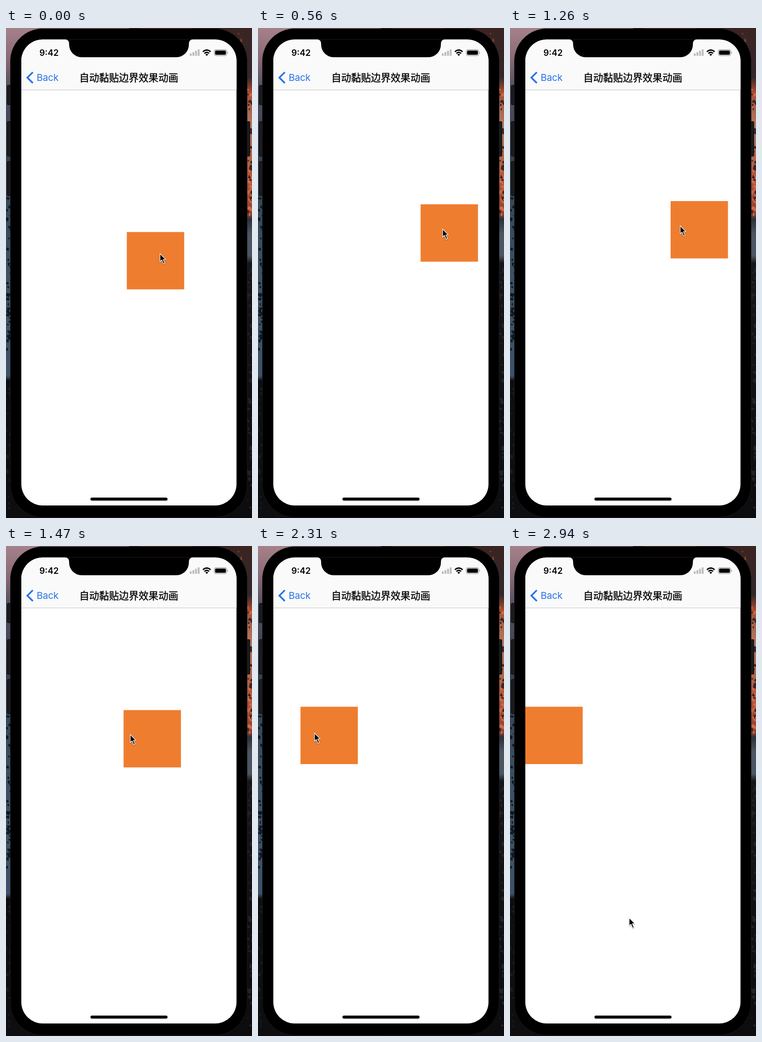
Animation, 530 px wide and 1056 px high, one loop 3010 ms. Source, as an HTML page:

```html
<!DOCTYPE html>
<html lang="zh">
<head>
<meta charset="utf-8">
<title>自动黏贴边界效果动画</title>
<style>
  html, body { margin: 0; width: 100%; height: 100%; overflow: hidden; background: #0c0c0e; }
  svg { display: block; width: 100%; height: 100%; }
  text { font-family: Inter, "Noto Sans", sans-serif; }
  .time { font-size: 18.5px; font-weight: 600; }
  .back { font-size: 20.5px; letter-spacing: -.2px; fill: #2874e6; }
  .title { font-family: "Noto Sans CJK SC", "Noto Sans CJK", sans-serif; font-size: 21.3px;
    font-weight: 500; stroke: #000; stroke-width: .35px; }
  .cursor { filter: drop-shadow(0 1.2px 1px rgba(0, 0, 0, .4)); }
</style>
</head>
<body>
<svg viewBox="0 0 530 1056">
  <defs>
    <linearGradient id="leftSky" x2="0" y2="1">
      <stop offset="0" stop-color="#a5828a"/>
      <stop offset=".06" stop-color="#8b6a76"/>
      <stop offset=".12" stop-color="#55505f"/>
      <stop offset=".25" stop-color="#33414f"/>
      <stop offset=".5" stop-color="#3c5164"/>
      <stop offset=".71" stop-color="#3d5268"/>
      <stop offset=".72" stop-color="#0d0e11"/>
      <stop offset="1" stop-color="#0e0e10"/>
    </linearGradient>
    <linearGradient id="rightSky" x2="0" y2="1">
      <stop offset="0" stop-color="#3a2421"/>
      <stop offset=".1" stop-color="#33272a"/>
      <stop offset=".13" stop-color="#a84c30"/>
      <stop offset=".2" stop-color="#a8806c"/>
      <stop offset=".3" stop-color="#b3573b"/>
      <stop offset=".38" stop-color="#8f4431"/>
      <stop offset=".39" stop-color="#2b3038"/>
      <stop offset=".42" stop-color="#4c5562"/>
      <stop offset=".465" stop-color="#4c5562"/>
      <stop offset=".48" stop-color="#151619"/>
      <stop offset="1" stop-color="#0c0c0e"/>
    </linearGradient>
  </defs>

  <rect width="265" height="1056" fill="url(#leftSky)"/>
  <rect x="265" width="265" height="1056" fill="url(#rightSky)"/>
  <path d="M288 0h112l12 3h-120z" fill="#7c3526"/>
  <g id="rocks"></g>

  <g fill="#1b1b1d" stroke="#08080a">
    <rect x="2.5" y="123.5" width="12" height="42" rx="2"/>
    <rect x="2.5" y="201.5" width="12" height="75" rx="2"/>
    <rect x="2.5" y="287.5" width="12" height="74" rx="2"/>
    <rect x="514.5" y="201.5" width="11" height="75" rx="2"/>
  </g>
  <rect x="9.5" y="1.5" width="510" height="1053" rx="70" stroke="#19191b"/>

  <rect x="33" y="24.7" width="463.6" height="1004.3" rx="46" fill="#fff"/>
  <path d="M33 133V70.7A46 46 0 0 1 79 24.7H450.6A46 46 0 0 1 496.6 70.7V133Z" fill="#fafafa"/>
  <path d="M33 133.5H496.6" stroke="#c3c3c5"/>
  <path d="M127 24.2Q136 25 136 34V36A27 27 0 0 0 163 63H367A27 27 0 0 0 394 36V34Q394 25 403 24.2Z"/>

  <text class="time" x="72" y="60">9:42</text>
  <g fill="#bcbcbe">
    <rect x="396" y="54.5" width="4" height="5.5" rx="1"/>
    <rect x="401.7" y="52" width="4" height="8" rx="1"/>
    <rect x="407.4" y="49" width="4" height="11" rx="1"/>
    <rect x="413.1" y="46" width="4" height="14" rx="1"/>
  </g>
  <g fill="none" stroke="#000" stroke-width="2.7">
    <path d="M424.2 51.2Q432.5 43.8 440.8 51.2"/>
    <path d="M427.3 54.8Q432.5 50.2 437.7 54.8"/>
  </g>
  <path d="M429.5 57Q432.5 54.6 435.5 57L432.5 60.2Z"/>
  <rect x="448.6" y="46.6" width="27" height="13" rx="3.8" fill="none" stroke="#98989a" stroke-width="1.2"/>
  <rect x="450.4" y="48.4" width="23.4" height="9.4" rx="2.3"/>
  <path d="M477 51Q480 53 477 55.5Z" fill="#98989a"/>

  <path d="M57.8 95.2L46 106.9L57.8 118.6" fill="none" stroke="#2874e6" stroke-width="3.6"/>
  <text class="back" x="66" y="114">Back</text>
  <text class="title" x="158" y="114.5">自动黏贴边界效果动画</text>
  <rect x="182" y="1012" width="166" height="6.5" rx="3.2"/>

  <rect id="box" width="123.6" height="123.6" fill="#ef7d2f"/>
  <g id="cursor"><path class="cursor" d="M-.3 .3V17.6L3.6 14.1L7.2 22.3L10.2 21L6.7 12.9H12Z"
    stroke="#fff" stroke-width="1.3" stroke-linejoin="round"/></g>
</svg>
<script>
  const STEP = 70, FRAMES = 43;
  const byId = id => document.getElementById(id);

  // Each key: step, x, y, and whether the approach is eased.
  const boxKeys = [
    [0, 260.3, 439.7], [4, 327, 395], [6, 338, 380], [11, 373, 380, true],
    [16, 373, 380], [18, 346, 373], [21, 253.3, 353.6], [24, 174, 350],
    [26, 117.8, 348.5], [28, 112, 346.4], [31, 112, 346.4], [37, 33, 346.4, true], [42, 33, 346.4]
  ];
  const cursorKeys = [
    [0, 332, 486], [4, 392, 445], [6, 398, 433], [16, 398, 433],
    [18, 367, 426], [21, 268, 406], [24, 186, 404], [26, 128, 403],
    [28, 122, 403], [39, 122, 403], [40, 128, 408], [42, 257, 801]
  ];

  function position(keys, step) {
    const i = Math.max(1, keys.findIndex(key => key[0] >= step));
    const [s0, x0, y0] = keys[i - 1], [s1, x1, y1, eased] = keys[i];
    let u = (step - s0) / (s1 - s0);
    if (eased) u *= u * (3 - 2 * u);
    return [x0 + (x1 - x0) * u, y0 + (y1 - y0) * u];
  }

  function place(id, keys, step) {
    byId(id).setAttribute('transform', `translate(${position(keys, step)})`);
  }

  let seed = 7;
  const random = () => (seed = seed * 16807 % 2147483647) / 2147483647;

  function scatter(count, x, top, bottom, color) {
    let d = '';
    for (let i = 0; i < count; i++) {
      const y = top + random() * (bottom - top);
      const w = 2 + random() * 5, h = 2 + random() * 6;
      d += `M${x + random() * 9} ${y}l${w} ${h / 3}l${-w / 3} ${h}l${-w} ${-h / 2}z`;
    }
    byId('rocks').insertAdjacentHTML('beforeend', `<path d="${d}" fill="${color}"/>`);
  }
  scatter(45, 0, 365, 690, '#111820');
  scatter(30, 500, 0, 130, '#8a4631');
  scatter(40, 520, 130, 400, '#d06a48');
  scatter(24, 520, 130, 400, '#39272a');
  scatter(45, 520, 510, 1040, '#222326');
  scatter(22, 0, 760, 1040, '#1c1c1f');

  const start = performance.now();
  function draw() {
    const step = Math.floor((performance.now() - start) / STEP) % FRAMES;
    place('box', boxKeys, step);
    place('cursor', cursorKeys, step);
    requestAnimationFrame(draw);
  }
  draw();
</script>
</body>
</html>
```
